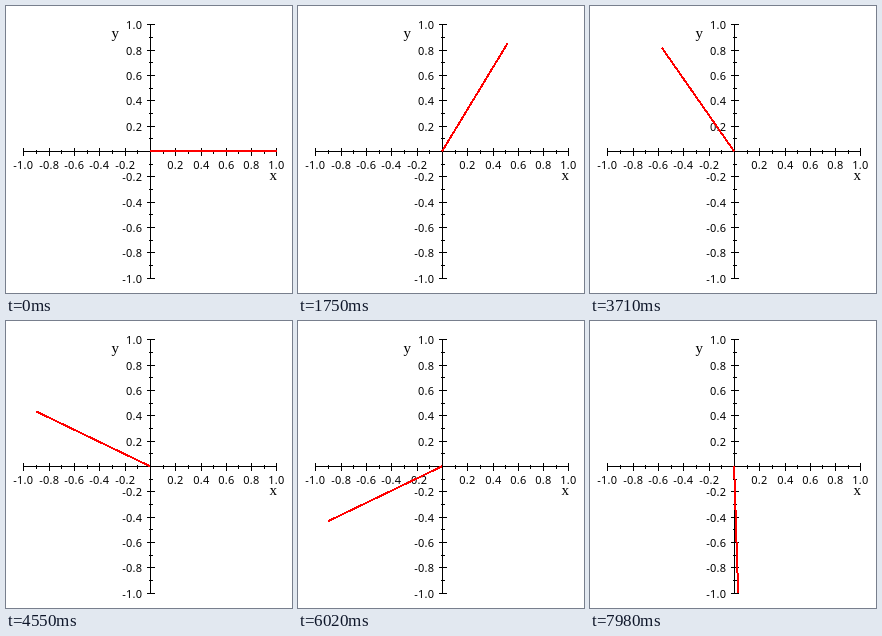
An HTML page for the animation above (8 s loop, 286x287 px).

```html
<!DOCTYPE html>
<html lang="en">
<head>
<meta charset="utf-8">
<title>Rotating radius</title>
<style>
  html, body { margin: 0; width: 286px; height: 287px; overflow: hidden; background: #fff; }
  svg { display: block; }
  .mark { fill: #000; shape-rendering: crispEdges; }
  .num { font: 11px "Noto Sans", "Open Sans", sans-serif; letter-spacing: 0.25px; }
  .name { font: 15px "Liberation Serif", serif; }
  #hand { stroke: #f00; stroke-width: 2; shape-rendering: crispEdges; }
</style>
</head>
<body>
<svg width="286" height="287" viewBox="0 0 286 287">
  <g id="axes">
    <rect class="mark" x="17" y="145" width="254" height="1"/>
    <rect class="mark" x="144" y="18" width="1" height="255"/>
  </g>
  <text class="name" x="263.5" y="174">x</text>
  <text class="name" x="105.5" y="32">y</text>
  <line id="hand" x1="144.1" y1="145.3" x2="270.6" y2="145.3"/>
</svg>
<script>
  const axes = document.getElementById('axes');
  const hand = document.getElementById('hand');
  const cx = 144.1, cy = 145.3, radius = 126.5;

  function add(tag, attrs, text = '') {
    const el = document.createElementNS('http://www.w3.org/2000/svg', tag);
    for (const key in attrs) el.setAttribute(key, attrs[key]);
    el.textContent = text;
    axes.append(el);
  }

  for (let i = -10; i <= 10; i++) {
    if (!i) continue;
    const major = i % 2 === 0;
    const x = Math.round(143.92 + i * 12.65);
    const y = Math.round(145 - i * 12.68);
    const size = major ? 8 : 4;
    const start = major ? 3 : 1;
    add('rect', { class: 'mark', x, y: 145 - start, width: 1, height: size });
    add('rect', { class: 'mark', x: 144 - start, y, width: size, height: 1 });
    if (major) {
      const label = (i / 10).toFixed(1);
      add('text', { class: 'num', x: x + 0.3, y: 163, 'text-anchor': 'middle' }, label);
      add('text', { class: 'num', x: 136.3, y: y + 5, 'text-anchor': 'end' }, label);
    }
  }

  // Every 16th step holds 70 ms longer than the usual 210 ms.
  function stepAt(t) {
    const round = Math.floor(t / 3430);
    return 16 * round + Math.max(0, Math.floor((t - 3430 * round - 70) / 210));
  }

  function draw(now) {
    const angle = stepAt(now % 8000) * 2 * Math.PI / 49;
    hand.setAttribute('x2', cx + radius * Math.cos(angle));
    hand.setAttribute('y2', cy - radius * Math.sin(angle));
    requestAnimationFrame(draw);
  }
  draw(0);
</script>
</body>
</html>
```
